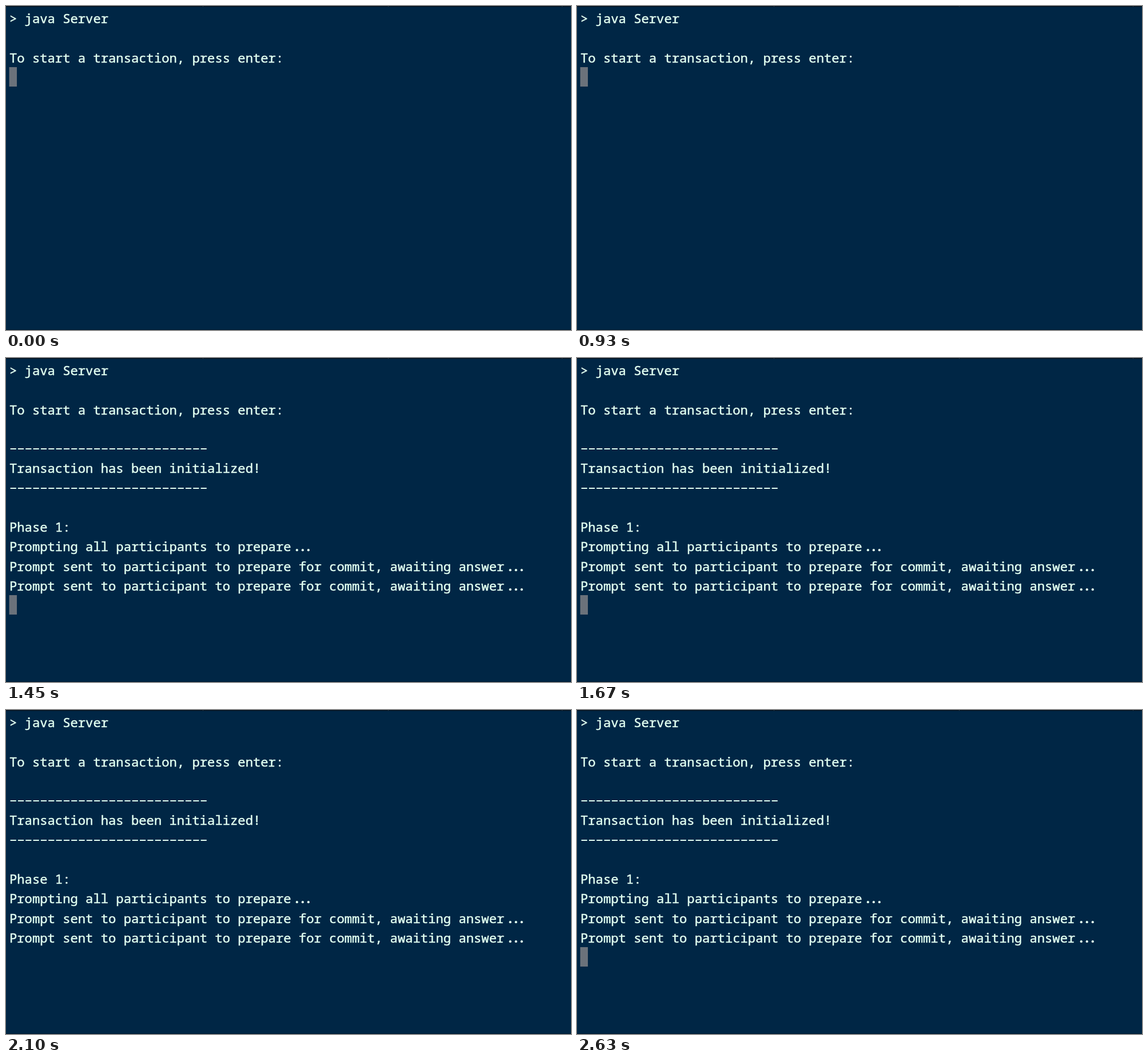
An HTML page with a canvas for the animation above (2660 ms loop, 988 px wide and 567 px high).

```html
<!DOCTYPE html>
<html lang="en">
<head>
<meta charset="utf-8">
<title>Terminal transaction</title>
<style>
  html, body { margin: 0; width: 100%; height: 100%; overflow: hidden; background: #002645; }
  canvas { display: block; width: 988px; height: 567px; }
</style>
</head>
<body>
<canvas id="stage" width="988" height="567"></canvas>
<script>
const ctx = document.getElementById('stage').getContext('2d');
const LOOP = 2660;
const ENTER_AT = 1130;
const BLINK = 570;
const FIRST_OFF = 270;
const LEFT = 6, CELL = 13.32, LINE = 34.22, BASE = 30.3;
const INK = '#e2fff1';

const RULE = '-'.repeat(26);
const SENT = 'Prompt sent to participant to prepare for commit, awaiting answer...';
const intro = ['> java Server', '', 'To start a transaction, press enter:'];
const output = [
  ...intro, '', RULE, 'Transaction has been initialized!', RULE, '',
  'Phase 1:', 'Prompting all participants to prepare...', SENT, SENT
];

function fillRect(color, x, y, w, h) {
  ctx.fillStyle = color;
  ctx.fillRect(x, y, w, h);
}

function drawRule(count, y) {
  for (let i = 0; i < count; i++) fillRect(INK, LEFT + i * CELL + 1.6, y - 9, 10.2, 2);
}

// The ellipsis is a ligature: three dots drawn closer than the cell grid.
function drawEllipsis(column, y) {
  const middle = LEFT + (column + 1.5) * CELL;
  for (const offset of [-10, 0, 10]) {
    ctx.beginPath();
    ctx.arc(middle + offset, y - 1.8, 2.1, 0, Math.PI * 2);
    ctx.fill();
  }
}

function drawLine(text, row) {
  const y = Math.round(BASE + row * LINE);
  if (text === RULE) return drawRule(text.length, y);
  const body = text.replace(/\.\.\.$/, '');
  ctx.fillStyle = ctx.strokeStyle = INK;
  ctx.fillText(body, LEFT, y);
  ctx.strokeText(body, LEFT, y);
  if (body !== text) drawEllipsis(body.length, y);
}

function cursorVisible(t) {
  if (t < ENTER_AT) return t < FIRST_OFF || t >= FIRST_OFF + BLINK;
  return Math.floor((t - ENTER_AT) / BLINK) % 2 === 0;
}

function draw(t) {
  fillRect('#002645', 0, 0, 988, 567);
  fillRect('#06121e', 0, 0, 988, 1.5);
  for (const x of [344, 668, 972]) fillRect('#384450', x, 0, 1, 1);
  fillRect('#001a30', 0, 566, 988, 1);

  ctx.font = `${CELL / 0.6}px "Noto Sans Mono", monospace`;
  ctx.textBaseline = 'alphabetic';
  ctx.lineJoin = 'round';
  ctx.lineWidth = 0.5; // slightly heavier than the regular weight
  const lines = t < ENTER_AT ? intro : output;
  lines.forEach(drawLine);
  if (cursorVisible(t)) {
    fillRect('#6b727b', LEFT - 0.4, Math.round(4.4 + lines.length * LINE), 13.4, 34);
  }
}

function frame() {
  draw(performance.now() % LOOP);
  requestAnimationFrame(frame);
}
frame();
</script>
</body>
</html>
```
